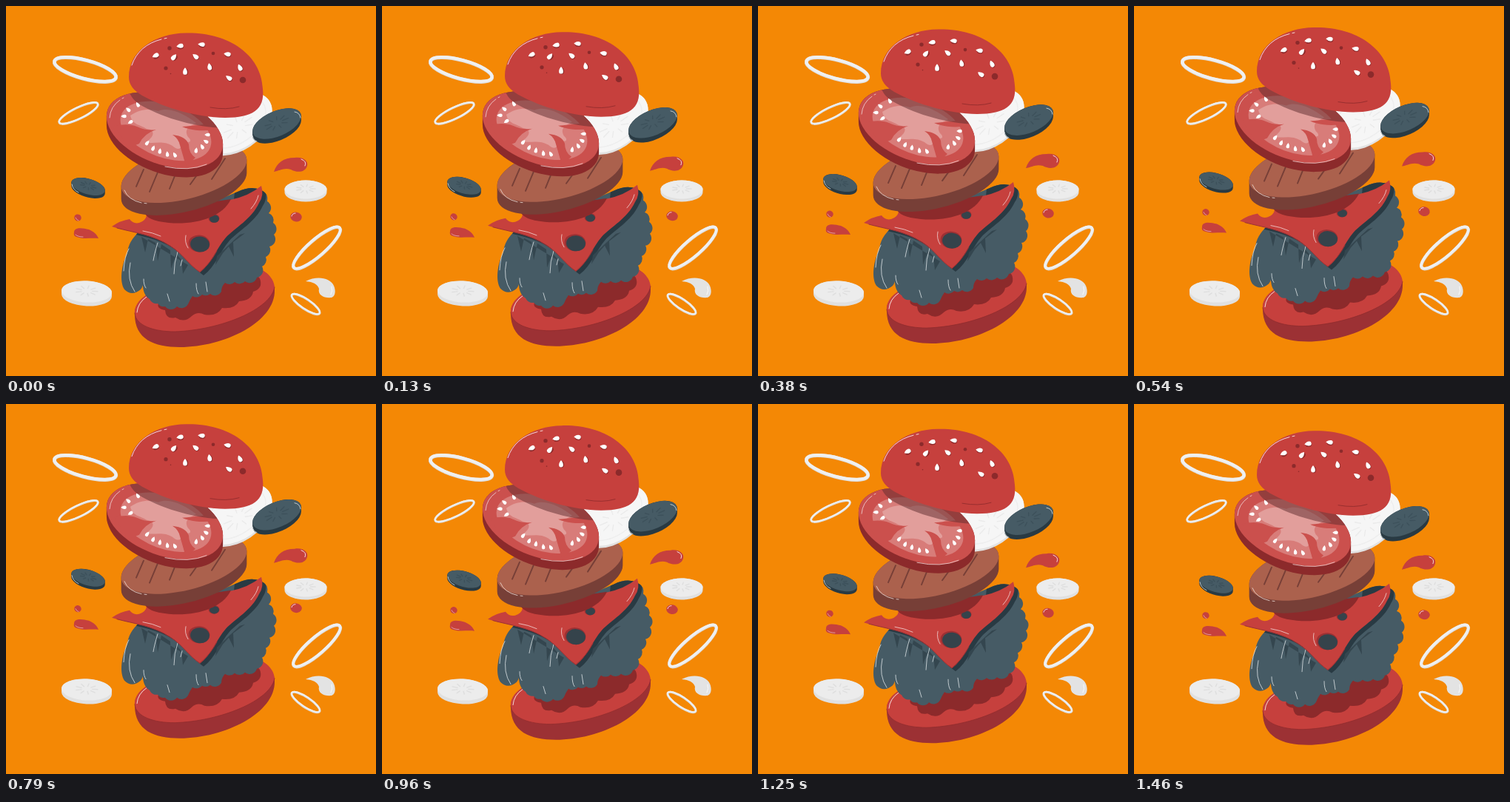
These frames come from a looping animation (500 by 500 pixels, 1500 ms). An HTML page:

```html
<!DOCTYPE html>
<html>
<head>
<meta charset="utf-8">
<style>
  html, body { margin: 0; height: 100%; overflow: hidden; background: #f48805 }
  svg { display: block; width: 100vw; height: 100vh }
  .line { fill: none; stroke-linecap: round }
</style>
</head>
<body>
<svg id="stage" viewBox="0 0 500 500"></svg>
<script>
const RED = '#c6403d', WINE = '#9c3134', SHADE = '#8c2a2b', SLATE = '#465b65', NIGHT = '#293a43';
const PERIOD = 1500, LIFT = 9.6;

const shape = (d, fill, more = '') => `<path d="${d}" fill="${fill}" ${more}/>`;
const line = (d, color = '#fff', width = 0.8) =>
  `<path class="line" d="${d}" stroke="${color}" stroke-width="${width}"/>`;
const oval = (x, y, rx, ry, angle, fill, more = '') =>
  `<ellipse rx="${rx}" ry="${ry}" transform="translate(${x} ${y}) rotate(${angle})" fill="${fill}" ${more}/>`;
const ring = (x, y, rx, ry, angle, width) =>
  oval(x, y, rx, ry, angle, 'none', `stroke="#dcdcdc" stroke-width="${width}"`) +
  oval(x, y - 0.6, rx, ry, angle, 'none', `stroke="#f0f0f0" stroke-width="${width - 1}"`);

// Tilted slice: an oval face with a rim of the given depth below it.
function slice(x, y, rx, ry, angle, depth, face, rim) {
  const a = angle * Math.PI / 180, c = Math.cos(a), s = Math.sin(a);
  const w = Math.hypot(rx * c, ry * s), dy = (rx * rx - ry * ry) * s * c / w;
  const arc = `A${rx} ${ry} ${angle} 0 1`;
  return shape(`M${x - w} ${y - dy}${arc} ${x + w} ${y + dy}v${depth}${arc} ${x - w} ${y - dy + depth}Z`, rim) +
    oval(x, y, rx, ry, angle, face);
}

// Small seeds radiating around the middle of a slice.
function pips(x, y, rx, ry, angle, color) {
  let d = '';
  for (let i = 0; i < 9; i++) {
    const a = i * Math.PI * 2 / 9, c = Math.cos(a), s = Math.sin(a);
    d += `M${c * rx * 0.5} ${s * ry * 0.5}L${c * rx} ${s * ry}`;
  }
  return `<g transform="translate(${x} ${y}) rotate(${angle})">${line(d, color, 1.4)}</g>`;
}

const seed = (x, y, angle, size = 1) => `<path fill="#fff" d="M-5 0Q-1-3.4 2-3A3 3 0 0 1 2 3Q-1 3.4-5 0"
  transform="translate(${x} ${y}) rotate(${angle}) scale(${size})"/>`;

// Outward bumps through points that run counterclockwise.
const bumps = points => points.map(([x, y]) => `A10 10 0 0 0 ${x} ${y}`).join('');

const still =
  ring(107, 86, 43, 12.5, 15, 5) + ring(98, 145, 29, 7.5, -26, 3) +
  ring(420, 327, 41, 11, -41, 4.5) + ring(405, 403, 22.5, 6.5, 34, 3) +
  slice(405, 248, 28.5, 12.5, 0, 4, '#ececec', '#e0e0e0') + pips(405, 247, 13, 6, 0, '#dedede') +
  slice(109, 386, 34, 14.5, 3, 5, '#ececec', '#e0e0e0') + pips(109, 385, 15, 7, 3, '#dedede') +
  shape('M405 372C420 364 438 367 443 378C446 385 445 392 440 394C430 395 421 391 423 382Q420 373 405 372', '#e3e3e3') +
  line('M440 379Q442 385 439 390');

const bunFront = 'C175 432 200 440 228 440C290 438 358 410 363 380';
const bottomBun =
  shape('M174 417C173 400 190 388 206 383L320 352C345 350 362 365 363 384C364 427 295 461 235 461C200 461 174 450 174 417Z', WINE) +
  shape('M174 415' + bunFront + 'C362 365 345 350 320 352L206 383C190 388 173 400 174 415Z', RED) +
  line('M174 415' + bunFront, SHADE, 0.7) +
  line('M177 414Q178 401 190 393') +
  shape('M206 402Q203 409 215 411Q216 424 229 421Q241 429 251 419Q259 412 268 417Q285 420 292 408' +
    'Q309 410 315 399Q332 398 334 386Q346 382 344 372Q343 363 330 362L240 385Z', SHADE);

const lettucePath = 'M181 304Q165 318 164 334C156 350 153 372 160 383Q170 393 182 383Q186 378 185 373Q184 390 194 396' +
  bumps([[205, 402], [215, 406], [231, 406], [246, 403]]) + 'Q249 396 252 392' +
  bumps([[265, 390], [276, 389], [291, 386]]) + 'Q291 379 296 374' +
  bumps([[309, 373], [323, 372], [339, 367], [346, 352], [351, 339], [356, 325],
    [362, 309], [361, 293], [355, 280], [353, 264]]) +
  'Q355 253 345 249Q332 242 313 251L220 290Z';

const cheesePath = 'M143 298Q154 290 167 288Q172 295 180 293Q189 290 190 283L303 262Q328 257 345 243' +
  'Q349 256 342 266C332 288 309 300 297 313C284 328 278 348 262 360C247 350 239 335 222 324C197 308 169 306 143 298Z';

const lettuce =
  shape(lettucePath, SLATE) +
  `<clipPath id="leaf"><path d="${lettucePath}"/></clipPath><g clip-path="url(#leaf)">` +
  shape('M310 240h32l6 12l-40 10Z', NIGHT) +
  shape(cheesePath, NIGHT, 'transform="translate(5 4)"') +
  shape('M183 312L188 333L192 315L202 320L205 345L210 322L222 330L223 355L230 335L237 343L239 362L246 350Z', '#34464f') +
  shape('M285 338L283 350L293 334L301 325L308 339L307 319L323 307L316 309Z', '#34464f') + '</g>' +
  line('M174 386Q163 370 168 347M159 358Q160 338 166 328M205 320Q200 337 199 344M232 332Q227 347 227 362' +
    'M238 343L236 351M257 375Q257 385 260 389M270 373L272 386M186 369Q186 377 189 381M218 389L221 399', '#dfe5e7');

const cheese =
  shape(cheesePath, RED) +
  line('M150 300C172 306 199 309 222 324.500C239 335 247 350 262 359.500Q276 348 285 331', WINE, 1) +
  oval(261, 321, 14.500, 11.500, 5, WINE) + oval(262, 322, 13, 10.500, 5, '#35434b') +
  oval(281, 287, 7.500, 6, 0, WINE) + oval(281.5, 287.500, 6.500, 5.200, 0, '#35434b') +
  line('M185 304Q198 306 209 311M243 310Q241 319 246 327M341 256Q339 265 331 274', '#f3d9d8') +
  shape('M187 278Q189 290 220 293C256 296 292 286 304 261Z', SHADE);

const patty =
  slice(240.5, 226, 87, 35, -14, 17, '#ab614d', '#773f37') +
  line('M186 221L176 244M207 220L194 251M232 220L221 247M267 216L249 241M296 206L278 234', '#773f37', 1.9) +
  line('M160 249Q165 262 183 266M187 266.500l3 .3', '#f0dfd9');

const onion =
  slice(312, 158, 53, 34, -35, 3, '#f6f6f6', '#e2e2e2') +
  oval(311, 158, 45, 27, -35, 'none', 'stroke="#eeeeee" stroke-width="1.5"') +
  pips(314, 163, 22, 13, -35, '#ebebeb');

const bunPath = 'M166 96C166 60 202 37 243 36.500C298 35 345 64 347 112C350 140 333 151 296 151' +
  'C258 150 217 139 184 121C172 114 166 106 166 96Z';

const tomatoSeeds = [[159, 149, 0], [165, 140, 40], [168, 157, -30], [178, 133, 60], [191, 185, 130], [199, 192, 115],
  [208, 196, 100], [218, 200, 85], [228, 201, 60], [257, 195, 100], [265, 190, 60], [270, 183, 30], [272, 174, 0]];
const FLESH = '#cb504d';

const tomato =
  slice(214.5, 168, 82, 46, 20, 12, FLESH, SHADE) +
  '<clipPath id="face">' + oval(214.5, 168, 82, 46, 20, '#000') + '</clipPath><g clip-path="url(#face)">' +
  oval(216, 169, 64, 36, 20, '#d87c79') +
  shape('M168 148C183 138 194 139 206 142C222 135 244 148 257 158C248 163 240 166 246 177C254 184 245 187 237 180' +
    'C239 194 233 196 225 189C212 181 199 187 189 184C200 177 203 168 190 166C181 160 171 161 168 148Z', '#e29e9b') +
  shape('M146 162Q165 158 177 163Q190 169 203 167Q187 172 180 186L165 192Z', FLESH) +
  shape('M243 216Q240 205 235 188Q233 179 225 174Q243 176 247 187Q247 199 256 205Z', FLESH) +
  shape('M285 167Q262 170 247 166Q242 165 238 163Q250 162 268 160Z', FLESH) +
  tomatoSeeds.map(s => seed(...s, 0.75)).join('') +
  shape(bunPath, '#5f2c2e', 'opacity=".5" transform="translate(0 14)"') + '</g>' +
  line('M140 151Q141 136 154 127M157 125l2-1M215 217Q247 224 271 214', '#f3d9d8');

const bunSeeds = [[202, 67, -25], [227, 69, 130], [235, 54, -10], [264, 52, 5], [256, 68, 40],
  [242, 88, 90], [275, 82, 80], [299, 65, 10], [316, 83, 65], [301, 97, 35]];
const crumbs = [[221, 57, 2.7], [216, 84, 2.6], [222.5, 91.5, 0.8], [280, 64, 2.3], [320, 100, 4.3]];

const topBun =
  shape(bunPath, RED) +
  crumbs.map(([x, y, r]) => oval(x, y, r, r, 0, SHADE)).join('') +
  bunSeeds.map(([x, y, a]) => oval(x + 1, y + 1.2, 4.3, 3, a, SHADE) + seed(x, y, a, 0.95)).join('') +
  line('M170 80C176 62 190 50 210 45M214 44l3-.6') +
  line('M276 137Q298 141 315 136', SHADE);

const pickles =
  slice(366, 159, 35, 17, -23, 6, SLATE, NIGHT) + pips(366, 158, 17, 8, -23, '#3d515b') +
  line('M333 175Q334 181 339 183M390 143Q397 144 398 151', '#dfe5e7') +
  slice(111, 244, 23.5, 10.5, 16, 4, SLATE, NIGHT) + pips(111, 243, 11, 5, 16, '#3d515b') +
  line('M89 241Q90 248 98 252', '#dfe5e7');

const drops =
  shape('M362 224C366 212 375 205 390 205C402 203 409 210 407 216C404 226 392 225 385 221C376 218 369 223 362 224Z', RED) +
  line('M399 207Q407 210 404 216') +
  oval(392, 285, 7.8, 6.4, 10, RED) + line('M386 284Q387 280 391 280') +
  oval(97, 286, 4.8, 4.5, 30, RED) + line('M94 286Q95 289 98 290', '#f3d9d8', 0.6) +
  shape('M92 306C92 298 104 300 112 302C119 305 123 309 125 314C115 313 106 315 99 313C93 312 91 310 92 306Z', RED) +
  line('M94 309Q97 312 104 312', '#f3d9d8', 0.6);

const stage = document.getElementById('stage');
stage.innerHTML = still + '<g id="floating">' + bottomBun + lettuce + cheese + patty + onion +
  tomato + topBun + pickles + drops + '</g>';
const floating = document.getElementById('floating');

function draw(now) {
  const phase = now % PERIOD / PERIOD;
  const up = 1 - Math.abs(1 - 2 * phase);
  const eased = (up + (1 - Math.cos(Math.PI * up)) / 2) / 2;
  floating.setAttribute('transform', `translate(0 ${-LIFT * eased})`);
  requestAnimationFrame(draw);
}
draw(performance.now());
</script>
</body>
</html>
```
